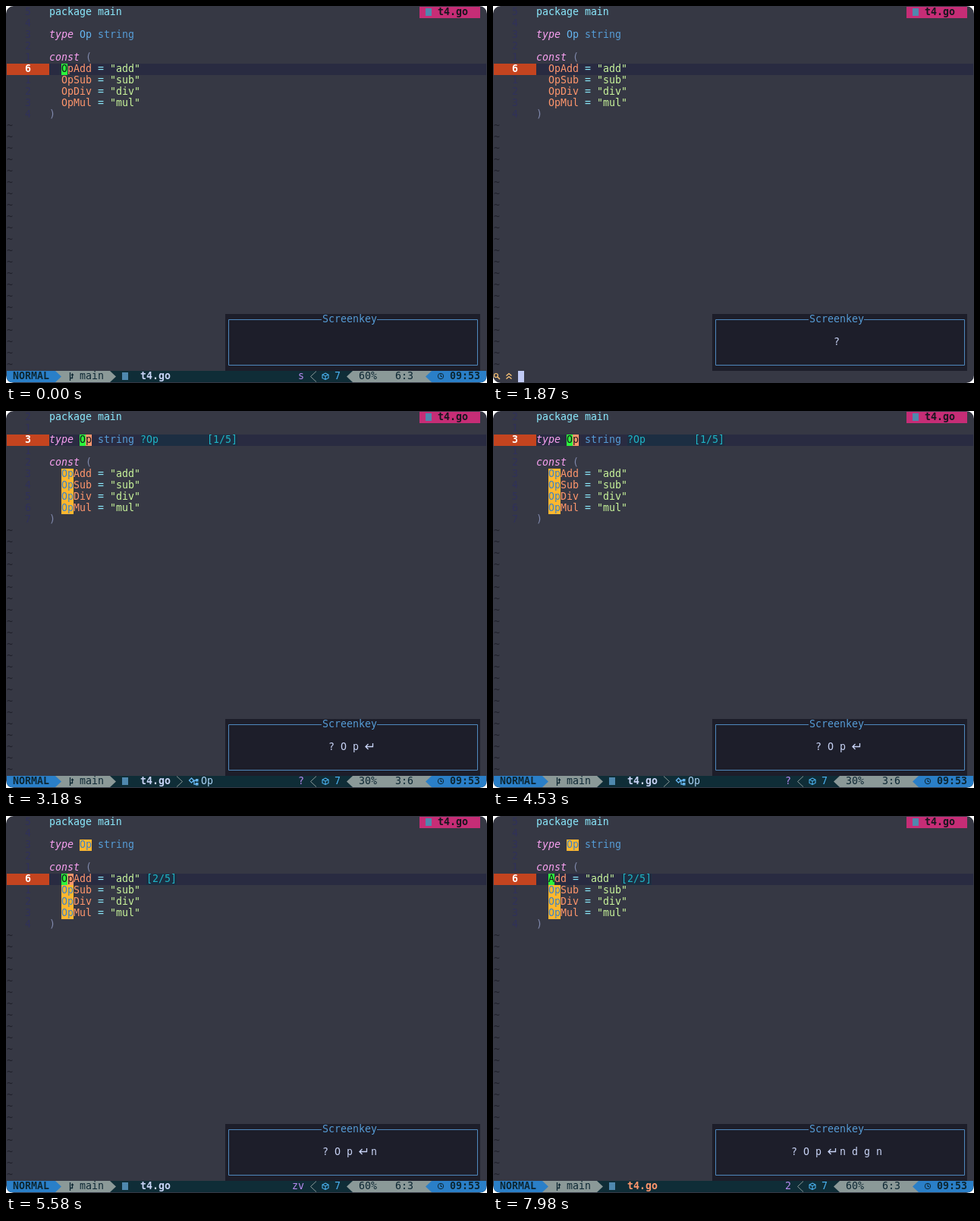
Animation, 634 px wide and 497 px high, one loop 8000 ms. Source, as an HTML page:

```html
<!DOCTYPE html>
<html lang="en">
<head>
<meta charset="utf-8">
<title>Editor search</title>
<style>
html, body { margin: 0; width: 100%; height: 100%; overflow: hidden; background: #fff; }
svg { display: block; width: 634px; height: 497px; }
text { font: 13.288px "DejaVu Sans Mono", monospace; white-space: pre; }
.b { font-weight: bold; }
.i { font-style: italic; }
</style>
</head>
<body>
<svg id="stage" viewBox="0 0 634 497"></svg>
<script>
const C = {
  bg: '#363844', line: '#292b41', num: '#c4441f', dim: '#30315a', tilde: '#20212b',
  cyan: '#8be9fd', pink: '#f8a0f0', blue: '#65b5f0', soft: '#569cd6', punct: '#7f88ab',
  orange: '#ff966c', str: '#c9f59b', green: '#2cf73c', black: '#15161e', hit: '#ffb72f',
  hitText: '#3d83c4', cur: '#ff966c', virt: '#1fb5c6', virtBg: '#1c2e42', panel: '#1d1e2a',
  edge: '#4f88bd', fg: '#c8d3f5', tag: '#c62d76', icon: '#4f88ae', bar: '#0f2d37',
  mode: '#2a7fc8', grey: '#8b9998', ink: '#0d2733', purple: '#b78af0', gold: '#ffc777', block: '#c0caf5'
};

// Terminal grid: 8 x 15 px cells, offset by one pixel.
const X = c => 1 + c * 8;
const Y = r => 1 + r * 15;

const rect = (x, y, w, h, fill, more = '') =>
  `<rect x="${x}" y="${y}" width="${w}" height="${h}" fill="${fill}" ${more}/>`;
const cells = (c, r, w, fill, h = 1) => rect(X(c), Y(r), w * 8, h * 15, fill);
const esc = s => s.replace(/&/g, '&amp;').replace(/</g, '&lt;');
const text = (c, r, s, fill, cls = '') =>
  `<text x="${X(c)}" y="${Y(r) + 11}" fill="${fill}" class="${cls}">${esc(s)}</text>`;
const fillPath = (d, fill) => `<path d="${d}" fill="${fill}"/>`;
const stroke = (d, color, w = 1) => `<path d="${d}" fill="none" stroke="${color}" stroke-width="${w}"/>`;
const mark = (c, r, s, bg, fg) => cells(c, r, s.length, bg) + text(c, r, s, fg);
const fileIcon = (c, r) => rect(X(c), Y(r) + 2, 8, 10, C.icon);

function gutter(row) {
  let out = cells(0, row, 7, C.num) + cells(7, row, 72, C.line) + text(3, row, String(row + 1), '#fff', 'b');
  for (let r = 0; r < 10; r++)
    if (r !== row) out += text(3, r, String(Math.abs(r - row)), C.dim);
  for (let r = 10; r < 32; r++) out += text(0, r, '~', C.tilde);
  return out;
}

function code(s) {
  let out = text(7, 0, 'package main', C.cyan) + text(7, 2, 'type', C.pink, 'i') +
    text(12, 2, 'Op', C.blue) + text(15, 2, 'string', C.soft) +
    text(7, 4, 'const', C.pink, 'i') + text(13, 4, '(', C.punct) + text(7, 9, ')', C.punct);
  ['Add', 'Sub', 'Div', 'Mul'].forEach((name, i) => {
    const r = 5 + i, id = (s.cut && !i ? '' : 'Op') + name, end = 9 + id.length;
    out += text(9, r, id, C.orange) + text(end + 1, r, '=', C.cyan) +
      text(end + 3, r, `"${name.toLowerCase()}"`, C.str);
    if (s.found && id.length > 3) out += mark(9, r, 'Op', C.hit, C.hitText);
  });
  if (s.found) out += mark(12, 2, 'Op', C.hit, C.hitText);
  if (s.trail) out += cells(12, 2, 1, C.mode);
  if (s.found && !s.cut) out += mark(s.row === 2 ? 12 : 9, s.row, 'Op', C.cur, C.black);
  if (!s.cmd) out += mark(s.row === 2 ? 12 : 9, s.row, s.cut ? 'A' : 'O', C.green, C.black);
  for (const [c, str, w] of s.virt || [])
    out += cells(c, s.row, w, C.virtBg) + text(c, s.row, str, C.virt);
  return out;
}

const fileTag = () => cells(68, 0, 10, C.tag) + fileIcon(69, 0) + text(71, 0, 't4.go', C.black, 'b');

function keys(str) {
  let out = cells(36, 27, 42, C.panel, 5) +
    stroke('M416 413.5H293.5V473.5H621.5V413.5H489', C.edge) + text(52, 27, 'Screenkey', C.soft);
  const start = 57 - Math.ceil(str.length / 2);
  [...str].forEach((k, i) => {
    const c = start + i, x = X(c);
    if (k === '~') out += stroke(`M${x + 10.5} 438V442.5H${x + 1}M${x + 4.5} 439L${x + 1} 442.5L${x + 4.5} 446`, C.fg, 1.3);
    else if (k !== ' ') out += text(c, 29, k, C.fg);
  });
  return out;
}

function menu(matched) {
  let out = cells(3, 26, 11, C.panel, 6) +
    rect(29.5, 398.5, 80, 75, 'none', `rx="3" stroke="${C.edge}"`) + cells(4, 27, 9, C.bg, 4);
  ['Add', 'Sub', 'Div', 'Mul'].forEach((name, i) => {
    const r = 27 + i, y = Y(r);
    out += text(5, r, 'Op' + name, C.fg) + text(5, r, 'Op'.slice(0, matched), C.blue) +
      stroke(`M89 ${y + 3.5}H96M92.5 ${y + 3}V${y + 11}M94.5 ${y + 6.5}H100M97.5 ${y + 6}V${y + 11}`, C.fg, 1.5);
  });
  return out;
}

function prompt(str) {
  return `<circle cx="4" cy="487" r="2.5" fill="none" stroke="${C.gold}" stroke-width="1.2"/>` +
    stroke('M6 489L9 492', C.gold, 1.4) +
    stroke('M17.5 487.5L21 484.5L24.5 487.5M17.5 491.5L21 488.5L24.5 491.5', C.gold, 1.3) +
    text(4, 32, str, '#7a88b8') + cells(4 + str.length, 32, 1, C.block);
}

function status(s) {
  let out = cells(0, 32, 79, C.bar) +
    fillPath('M65 481H137L145 488.5L137 496H65Z', C.grey) +
    fillPath('M1 481H65L73 488.5L65 496H1Z', C.mode) +
    text(1, 32, 'NORMAL', C.ink, 'b') +
    stroke('M84.5 483V494M84.5 490.5H87.5V486', C.ink, 1.3) +
    fillPath('M85.5 487L87.5 484L89.5 487Z', C.ink) +
    text(12, 32, 'main', C.ink) + fileIcon(19, 32) +
    text(22, 32, 't4.go', s.cut ? C.orange : C.fg, 'b');
  if (s.crumb) out += stroke('M225 481.5L232.5 488.5L225 495.5', C.grey) +
    stroke('M241.5 487L244.5 484L247.5 487L244.5 490ZM247 487H250M248 487V492H250', C.blue, 1.3) +
    rect(250, 485, 3.5, 3.5, C.blue) + rect(250, 490, 3.5, 3.5, C.blue) + text(32, 32, 'Op', '#a9d2f5');
  out += text(49 - s.cmdKeys.length, 32, s.cmdKeys, C.purple) +
    stroke('M409 481.5L401.5 488.5L409 495.5', C.grey) +
    stroke('M421 484L425 486V490.5L421 492.5L417 490.5V486ZM417 486L421 488L425 486M421 488V492.5', '#4bb1ee', 1.1) +
    text(54, 32, '7', '#4bb1ee') +
    fillPath('M457 481H561V496H457L449 488.5Z', C.grey) +
    text(58, 32, s.row === 2 ? '30%' : '60%', C.ink) + text(64, 32, s.row === 2 ? '3:6' : '6:3', C.ink) +
    fillPath('M561 481H633V496H561L553 488.5Z', C.mode) +
    `<circle cx="573" cy="488" r="3.7" fill="none" stroke="${C.ink}"/>` +
    stroke('M573 485.5V488.5H575', C.ink) + text(73, 32, '09:53', C.ink, 'b');
  return out;
}

const hit = { row: 5, found: true, cmdKeys: 'zv', keys: '? O p ~ n', virt: [[23, '[2/5]', 5]] };
const find = { row: 2, found: true, cmd: true, query: 'Op', keys: '? O p' };
const steps = [
  [0, { row: 5, cmdKeys: 's', keys: '' }],
  [800, { row: 5, cmd: true, query: '', keys: '?' }],
  [2130, { ...find, matched: 1 }],
  [2390, { ...find, matched: 2 }],
  [3180, { row: 2, found: true, crumb: true, cmdKeys: '?', keys: '? O p ~',
    virt: [[22, '?Op', 11], [33, '[1/5]', 5]] }],
  [5320, { ...hit, trail: true }],
  [5580, hit],
  [7980, { ...hit, cut: true, cmdKeys: '2', keys: '? O p ~ n d g n', virt: [[21, '[2/5]', 5]] }]
];

const scene = s =>
  '<clipPath id="win"><rect width="634" height="497" rx="10"/></clipPath><g clip-path="url(#win)">' +
  rect(0, 0, 634, 497, C.bg) + gutter(s.row) + code(s) + fileTag() + keys(s.keys) +
  (s.matched ? menu(s.matched) : '') + (s.cmd ? prompt(s.query) : status(s)) + '</g>';

const stage = document.getElementById('stage');
const t0 = performance.now();
let shown = -1;
function draw(now) {
  const t = Math.max(0, now - t0) % 8000;
  const n = steps.findLastIndex(([at]) => at <= t);
  if (n !== shown) stage.innerHTML = scene(steps[shown = n][1]);
  requestAnimationFrame(draw);
}
draw(t0);
</script>
</body>
</html>
```
